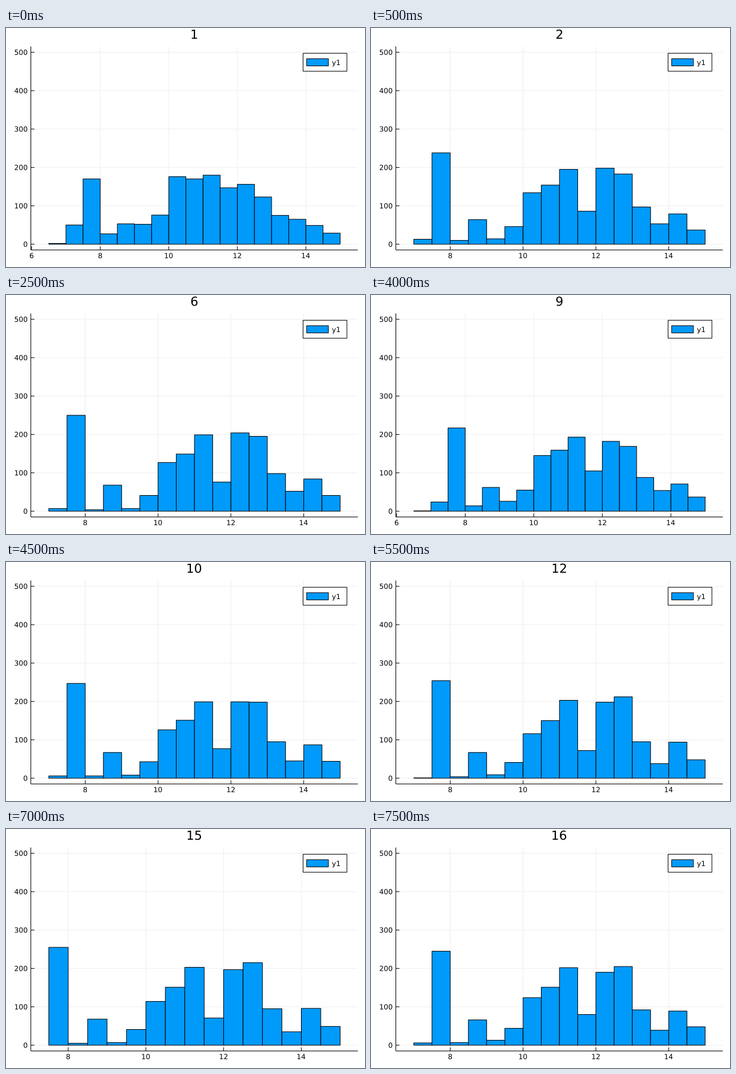
Recreate the animation shown at these times as a matplotlib script. Size 600x400 px, loop 8 s.

```python
import numpy as np
import matplotlib.pyplot as plt
from matplotlib.animation import FuncAnimation
from matplotlib.patches import PathPatch, Rectangle
from matplotlib.path import Path
from matplotlib.textpath import TextPath

W, H, DPI = 600, 400, 100
PX = 72 / DPI                       # one pixel in points
STEPS, STEP_MS = 16, 500
BLUE, GRID = "#009AFA", "#EFEFEF"
LEFT, RIGHT, TOP, BOTTOM = 41.5, 588, 31, 371.5
BAR_LEFT, BAR_RIGHT = 71.5, 558.5
FIRST, LAST, BIN = 6.5, 15, 0.5
SMALL, LARGE = 11.8, 20.8           # text sizes in pixels

# Two histogram shapes, and how the settled one slowly shifts (bin: change)
SPREAD = np.array([2, 50, 170, 27, 53, 52, 76, 176, 170, 180,
                   147, 156, 123, 75, 65, 49, 29])
SETTLED = np.array([0, 7, 250, 5, 68, 7, 41, 126, 150, 199,
                    76, 204, 194, 100, 51, 84, 40])
DRIFT = {1: -7, 2: 5, 7: -10, 9: 5, 10: -5, 11: -8,
         12: 21, 13: -6, 14: -14, 15: 10, 16: 9}
# Jolts push the samples back towards the spread shape (step: strength)
JOLTS = {1: 1, 9: 0.42, 16: 0.12}
DECAY = 0.15


def smoothstep(t):
    t = min(max(t, 0), 1)
    return t * t * (3 - 2 * t)


def counts_at(step):
    rest = SETTLED.astype(float)
    for k, change in DRIFT.items():
        rest[k] += change * smoothstep((step - 6) / 8)
    # a few samples hop between neighbouring bins
    hop = np.random.default_rng(step).integers(-1, 2, len(rest) - 3)
    rest[3:] += hop - np.roll(hop, 1)
    loose = max(s * DECAY ** (step - at) for at, s in JOLTS.items() if at <= step)
    return np.rint(rest + loose * (SPREAD - rest)).astype(int)


def y_px(v):
    return BOTTOM - (v + 15) / 530 * (BOTTOM - TOP)


fig = plt.figure(figsize=(W / DPI, H / DPI), dpi=DPI, facecolor="white")
ax = fig.add_axes([0, 0, 1, 1])


def line(xs, ys, color="black", z=3):
    ax.plot(xs, ys, color=color, lw=PX, zorder=z, solid_capstyle="butt", snap=False)


def box(x0, y0, x1, y1, fill, z):
    ax.add_patch(Rectangle((x0, y0), x1 - x0, y1 - y0, facecolor=fill,
                           edgecolor="black", lw=PX, zorder=z, snap=False))


def label(x, y, s, size=SMALL, align=0.5):
    """Put text on baseline y; align 0, 0.5, 1 is left, centre, right."""
    glyphs = TextPath((0, 0), s, size=size, prop={"family": "DejaVu Sans"})
    ink = glyphs.get_extents()
    shift = [x - ink.x0 - align * ink.width, y]
    path = Path(glyphs.vertices * [1, -1] + shift, glyphs.codes)
    ax.add_patch(PathPatch(path, facecolor="black", lw=0, zorder=6, snap=False))


def draw(i):
    ax.clear()
    ax.set(xlim=(0, W), ylim=(H, 0))
    ax.axis("off")

    counts = counts_at(i + 1)
    skip = int(np.flatnonzero(counts)[0])
    start = FIRST + skip * BIN
    scale = (BAR_RIGHT - BAR_LEFT) / (LAST - start)

    def x_px(v):
        return BAR_LEFT + (v - start) * scale

    for v in range(0, 501, 100):
        y = y_px(v)
        line([LEFT, RIGHT], [y, y], GRID, 1)
        line([LEFT, LEFT + 6], [y, y])
        label(35.5, y + 0.364 * SMALL, str(v), align=1)
    for v in range(6, 15, 2):
        x = x_px(v)
        if x >= LEFT:
            line([x, x], [TOP, BOTTOM], GRID, 1)
            line([x, x], [BOTTOM, BOTTOM - 6])
            label(x, 385.2, str(v))

    for k, n in enumerate(counts[skip:]):
        left = start + k * BIN
        box(x_px(left), y_px(n), x_px(left + BIN), y_px(0), BLUE, 2)

    line([LEFT, LEFT], [TOP, BOTTOM])
    line([LEFT, RIGHT], [BOTTOM, BOTTOM])

    box(496.5, 42.3, 569.8, 72.3, "white", 4)
    box(502.5, 51.4, 538.9, 63.4, BLUE, 5)
    label(545, 62, "y1", align=0)
    label(314.8, 18, str(i + 1), size=LARGE)
    return []


anim = FuncAnimation(fig, draw, frames=STEPS, interval=STEP_MS,
                     init_func=lambda: draw(0), repeat=True)
plt.show()
```
